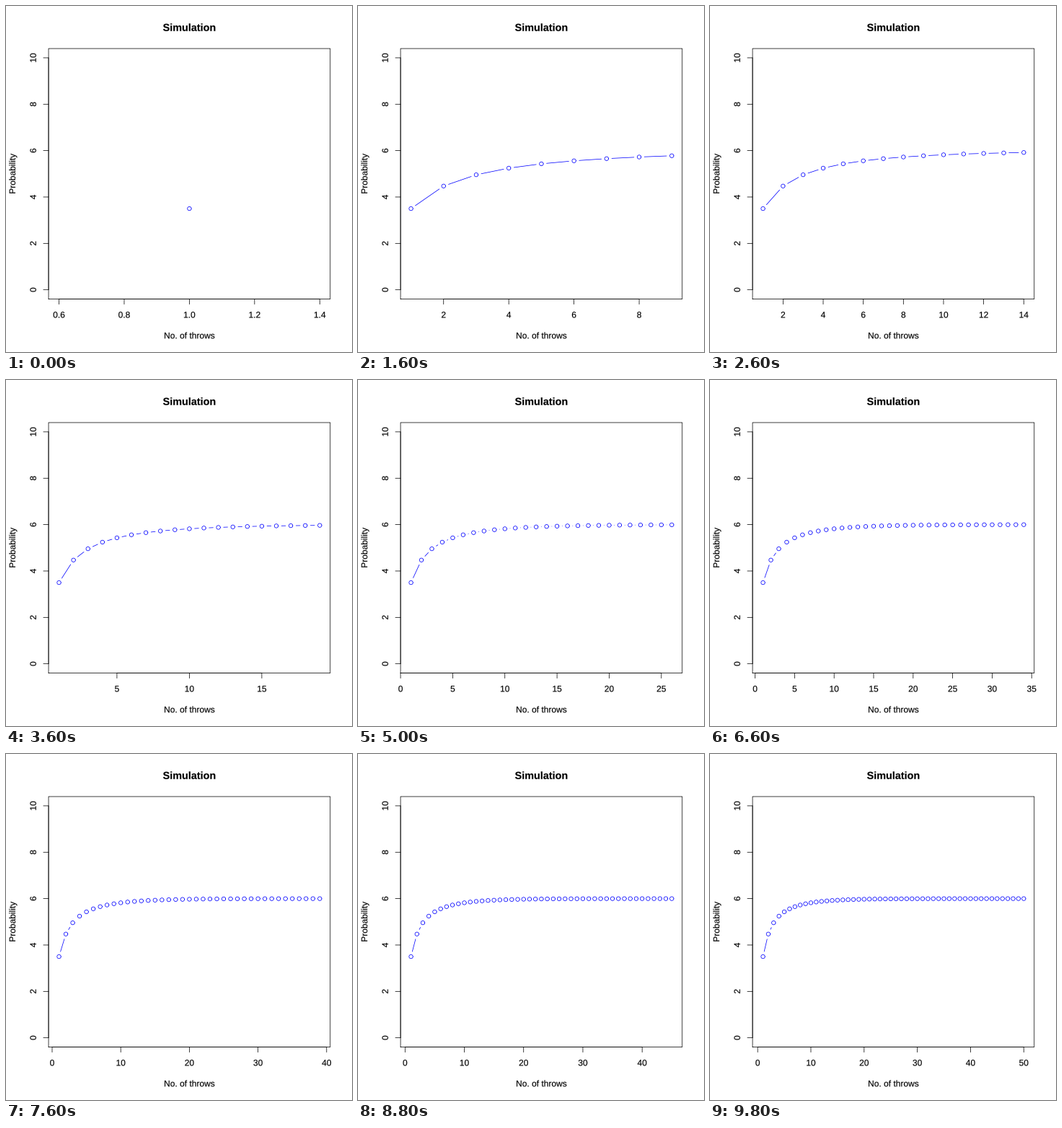
Recreate the animation shown at these times as a matplotlib script. Size 480 by 480 pixels, loop 10 s.

```python
import math

import numpy as np
import matplotlib.pyplot as plt
from matplotlib.animation import FuncAnimation
from matplotlib.collections import LineCollection, PathCollection
from matplotlib.textpath import TextPath
from matplotlib.transforms import Affine2D

SIZE, DPI = 480, 72
THROWS = 50
LINE = 14.4                       # height of one margin line
LEFT, RIGHT = 4.1 * LINE, SIZE - 2.1 * LINE
TOP, BOTTOM = 4.1 * LINE, SIZE - 5.1 * LINE
TICK = LINE / 2
GAP = LINE / 2                    # space left around each point
RADIUS = 2.7
THIN = 0.75

plt.rcParams["path.snap"] = False

fig = plt.figure(figsize=(SIZE / DPI, SIZE / DPI), dpi=DPI, facecolor="white")
ax = fig.add_axes([0, 0, 1, 1])
ax.set_xlim(0, SIZE)
ax.set_ylim(SIZE, 0)
ax.axis("off")


def expected_max(n):
    """Mean of the highest of n dice."""
    return 6 - sum((k / 6) ** n for k in range(1, 6))


def y_pos(v):
    return BOTTOM - (v + 0.4) / 10.8 * (BOTTOM - TOP)


def x_range(n):
    lo, hi = (0.6, 1.4) if n == 1 else (1, n)
    pad = 0.04 * (hi - lo)
    return lo - pad, hi + pad


def tick_step(span):
    cell = span / 5
    base = 10 ** math.floor(math.log10(cell))
    step = base
    for mult, bias in ((2, 0.8), (5, 1.7), (10, 0.8)):
        if mult * base - cell >= bias * (cell - step):
            break
        step = mult * base
    return step


def glyphs(x, y, text, size=12, weight="normal", turn=0):
    """Outline of text centred on x, y at its baseline."""
    font = {"family": "Liberation Sans", "weight": weight}

    def outline(s):
        return TextPath((0, 0), s, size=size, prop=font)

    # Advance width: how far the text pushes a following letter
    width = (outline(text + "l").get_extents().x1
             - outline("l").get_extents().x1)
    place = (Affine2D().translate(-width / 2, 0).scale(1, -1)
             .rotate_deg(-turn).translate(x, y))
    return outline(text).transformed(place)


def add_glyphs(paths):
    group = PathCollection(paths, facecolors="black", edgecolors="black",
                           linewidths=0.15)
    ax.add_collection(group, autolim=False)
    return group


def add_lines(segments, color="black"):
    group = LineCollection(segments, colors=color, linewidths=THIN,
                           capstyle="round", joinstyle="round")
    ax.add_collection(group, autolim=False)
    return group


# Fixed parts: frame, y axis and titles
y_values = range(0, 11, 2)
mid_x, mid_y = (LEFT + RIGHT) / 2, (TOP + BOTTOM) / 2

add_lines([[(LEFT, BOTTOM), (RIGHT, BOTTOM), (RIGHT, TOP), (LEFT, TOP),
            (LEFT, BOTTOM)]])
add_lines([[(LEFT, y_pos(0)), (LEFT, y_pos(10))]]
          + [[(LEFT, y_pos(v)), (LEFT - TICK, y_pos(v))] for v in y_values])
add_glyphs([glyphs(LEFT - 1.2 * LINE, y_pos(v), str(v), turn=90)
            for v in y_values])
add_glyphs([
    glyphs(mid_x, TOP / 2 + 5.2, "Simulation", size=14.4, weight="bold"),
    glyphs(mid_x, BOTTOM + 3.8 * LINE, "No. of throws"),
    glyphs(LEFT - 3.2 * LINE, mid_y, "Probability", turn=90),
])

# Parts that follow the number of throws
x_axis = add_lines([])
x_labels = add_glyphs([])
curve = add_lines([], "blue")

angle = np.linspace(0, 2 * np.pi, 49)
ring = RADIUS * np.column_stack([np.cos(angle), np.sin(angle)])


def draw(frame):
    n = frame + 1
    lo, hi = x_range(n)

    def x_pos(v):
        return LEFT + (v - lo) / (hi - lo) * (RIGHT - LEFT)

    step = tick_step(hi - lo)
    first = math.ceil(lo / step - 1e-7)
    last = math.floor(hi / step + 1e-7)
    values = [k * step for k in range(first, last + 1)]
    digits = 1 if step < 1 else 0
    spots = [x_pos(v) for v in values]
    x_axis.set_segments([[(spots[0], BOTTOM), (spots[-1], BOTTOM)]]
                        + [[(x, BOTTOM), (x, BOTTOM + TICK)] for x in spots])
    x_labels.set_paths([glyphs(x, BOTTOM + 1.8 * LINE, f"{v:.{digits}f}")
                        for x, v in zip(spots, values)])

    pts = np.array([(x_pos(k), y_pos(expected_max(k)))
                    for k in range(1, n + 1)])
    parts = [p + ring for p in pts]
    for a, b in zip(pts, pts[1:]):
        dist = np.hypot(*(b - a))
        if dist > 2 * GAP:
            cut = (b - a) * GAP / dist
            parts.append(np.array([a + cut, b - cut]))
    curve.set_segments(parts)
    return [x_axis, x_labels, curve]


anim = FuncAnimation(fig, draw, frames=THROWS, interval=200,
                     init_func=lambda: draw(0), repeat=True, repeat_delay=0)
plt.show()
```
